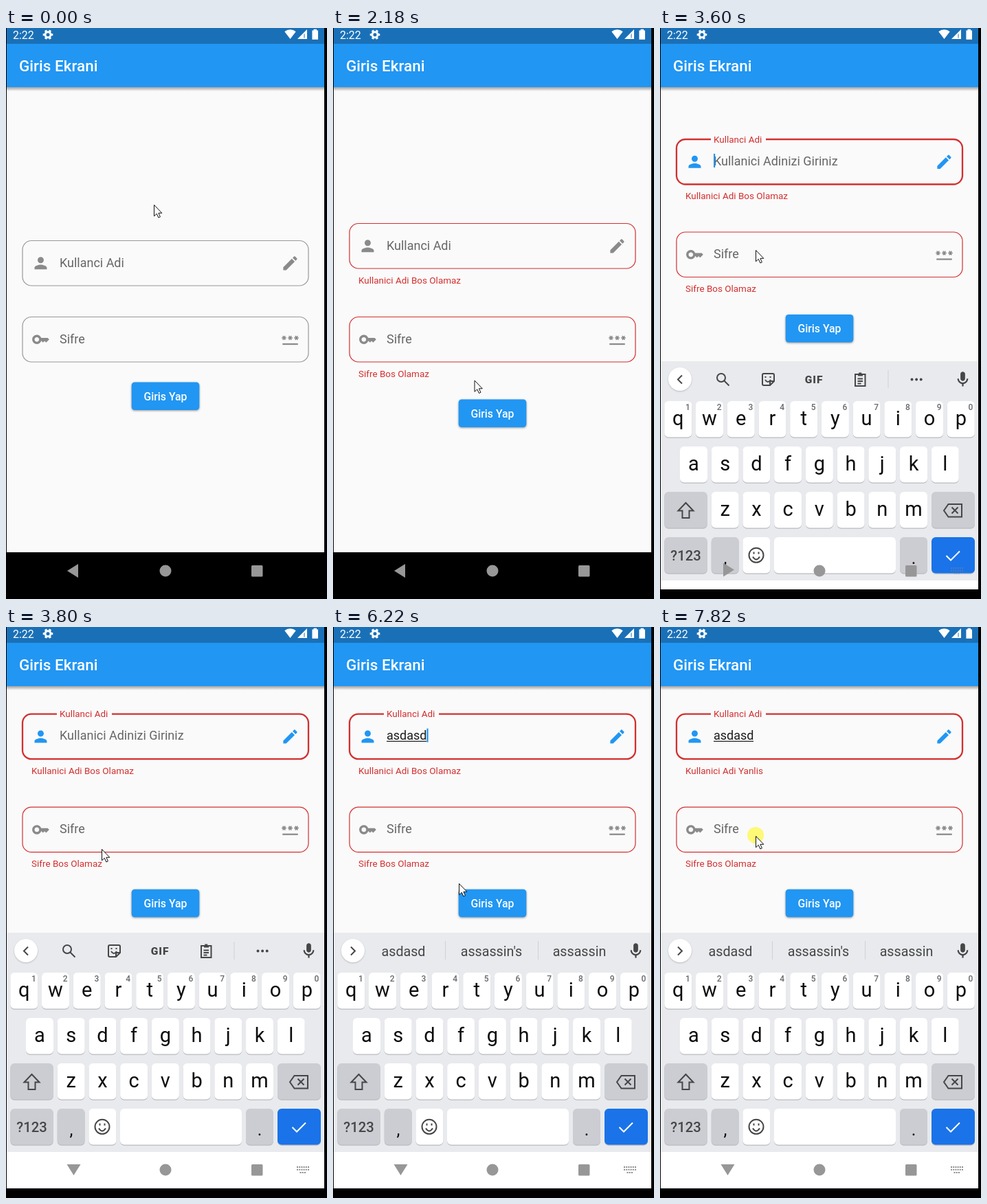
An HTML page that plays this animation: 467x831 px, repeating every 8 s.

```html
<!DOCTYPE html>
<html lang="tr">
<head>
<meta charset="utf-8">
<title>Giris Ekrani</title>
<style>
  html, body { margin: 0; width: 100%; height: 100%; overflow: hidden; background: #000; }
  svg { display: block; width: 100%; height: 100%; font-family: Roboto, sans-serif; }
  .line { fill: none; stroke: #444746; stroke-width: 2; }
  .input { font-size: 17.98px; fill: #666; }
  .small { font-size: 13.48px; fill: #d32f2f; }
  .icon { fill: #8a8a8a; }
  .nav { fill: #979797; }
  .letter { font-size: 29px; fill: #0c0c0c; text-anchor: middle; }
  .digit { font-size: 12px; font-weight: 500; fill: #66696d; text-anchor: end; }
  .word { font-size: 19.7px; fill: #444746; text-anchor: middle; }
</style>
</head>
<body>
<svg viewBox="0 0 467 831">
  <defs>
    <linearGradient id="fade" x2="0" y2="1">
      <stop stop-opacity=".36"/><stop offset="1" stop-opacity="0"/>
    </linearGradient>
    <clipPath id="btnClip"><rect x="182.7" width="98.6" height="40.5" rx="4.5"/></clipPath>
  </defs>
  <rect width="467" height="831"/>
  <rect x="1" width="462" height="763" fill="#fafafa"/>
  <rect x="1" y="86" width="462" height="6" fill="url(#fade)"/>
  <rect x="1" y="23" width="462" height="63" fill="#2196f3"/>
  <rect x="1" width="462" height="23" fill="#1a70b7"/>
  <text x="19" y="63" font-size="22.5" font-weight="500" fill="#fff">Giris Ekrani</text>

  <g fill="#fff">
    <text x="10" y="16" font-size="16">2:22</text>
    <g fill="none" stroke="#fff">
      <circle cx="61" cy="9.7" r="4" stroke-width="3"/>
      <circle cx="61" cy="9.7" r="6" stroke-width="2.6" pathLength="12" stroke-dasharray="1" stroke-dashoffset=".5"/>
    </g>
    <path d="M405.3 5.3a12.3 12.3 0 0 1 16.4 0L413.5 16z"/>
    <path d="M438 2v14h-14z"/>
    <path d="M433.5 9v5.6h1V8z" fill="#1a70b7"/>
    <path d="M447.5 3.4v-1.6h4.5v1.6h2v13.4h-8.6v-13.4z"/>
  </g>

  <g id="user">
    <rect class="box" x="24" width="416" height="65.5" rx="13" fill="none"/>
    <g id="floating">
      <rect x="74" y="-3" width="80" height="6" fill="#fafafa"/>
      <text class="small" x="78" y="4.5">Kullanci Adi</text>
    </g>
    <g class="icon" id="userIcons">
      <path transform="translate(37 19.3) scale(1.124)" d="M12 12c2.21 0 4-1.79 4-4s-1.79-4-4-4-4 1.79-4 4 1.79 4 4 4zm0 2c-2.67 0-8 1.34-8 4v2h16v-2c0-2.66-5.33-4-8-4z"/>
      <path transform="translate(400 19.3) scale(1.124)" d="M3 17.25V21h3.75L17.81 9.94l-3.75-3.75L3 17.25zM20.71 7.04c.39-.39.39-1.02 0-1.41l-2.34-2.34c-.39-.39-1.02-.39-1.41 0l-1.83 1.83 3.75 3.75 1.83-1.83z"/>
    </g>
    <text class="input" id="hint" x="78"></text>
    <text class="input" id="typed" x="78" y="37.3" style="fill:#1c1c1c"></text>
    <path id="under" d="M78 39.6h58" stroke="#222" stroke-width="1.2"/>
    <rect id="caret" y="21" width="2.2" height="20" fill="#2196f3"/>
    <text class="small error" x="37" y="87" id="userError"></text>
  </g>

  <g id="pass">
    <rect class="box" x="24" width="416" height="65.5" rx="13" fill="none"/>
    <g class="icon">
      <path transform="translate(37 19.3) scale(1.124)" d="M21 10h-8.35C11.83 7.67 9.61 6 7 6c-3.31 0-6 2.69-6 6s2.69 6 6 6c2.61 0 4.83-1.67 5.65-4H13l2 2 2-2 2 2 4-4.04L21 10zM7 15c-1.65 0-3-1.35-3-3s1.35-3 3-3 3 1.35 3 3-1.35 3-3 3z"/>
      <g id="stars" transform="translate(400 19.3) scale(1.124)" stroke="#8a8a8a" stroke-width="1.5"><path d="M2 18h20" stroke-width="2"/></g>
    </g>
    <text class="input" x="78" y="38.3">Sifre</text>
    <text class="small error" x="37" y="87">Sifre Bos Olamaz</text>
  </g>

  <g id="btn">
    <rect id="btnFace" x="182.7" width="98.6" height="40.5" rx="4.5"/>
    <g clip-path="url(#btnClip)"><circle id="ripple" cy="28" fill="#fff"/></g>
    <text x="232" y="26" font-size="15.75" font-weight="500" fill="#fff" text-anchor="middle">Giris Yap</text>
  </g>

  <rect id="navBack" x="1" y="764" width="462" height="53" fill="#fff"/>
  <g id="keyboard">
    <rect x="1" y="445" width="462" height="319" fill="#e8eaed"/>
    <circle cx="29" cy="471" r="17" fill="#fff" style="filter:drop-shadow(0 1px 1px #0003)"/>
    <path id="chevron" class="line"/>
    <path transform="translate(427 458) scale(1.124)" fill="#444746" d="M12 14c1.66 0 3-1.34 3-3V5c0-1.66-1.34-3-3-3S9 3.34 9 5v6c0 1.66 1.34 3 3 3zm5-3c0 2.76-2.24 5-5 5s-5-2.24-5-5H5c0 3.53 2.61 6.43 6 6.92V21h2v-3.08c3.39-.49 6-3.39 6-6.92h-2z"/>
    <g id="tools" class="line">
      <circle cx="89" cy="469" r="6"/><path d="M93.5 473.5l7 7"/>
      <path d="M151 463h13q2 0 2 2v9l-6 6h-9q-2 0-2-2v-13q0-2 2-2zM166 474h-4q-2 0-2 2v4M153 472q4 6 8 0M153.5 467v2M160.5 467v2"/>
      <path d="M284 464h14.500v17h-14.500zM288 465.500h7M287.500 470.500h7.500M287.500 474h7.500M287.500 477.500h5"/>
      <path d="M291.2 461.500v2" stroke-width="4"/>
      <path d="M332 458v26" stroke="#cfd1d4" stroke-width="1"/>
      <path d="M366.500 471.500h.01m6.600 0h.01m6.600 0h.01" stroke-width="4" stroke-linecap="round"/>
      <text x="224" y="476.500" font-size="15.500" font-weight="900" letter-spacing="1" text-anchor="middle" fill="#444746" stroke="none">GIF</text>
    </g>
    <g id="words">
      <path d="M163.500 457v27M298.500 457v27" stroke="#cfd1d4"/>
      <text class="word" x="102.500" y="478.500"></text>
      <text class="word" x="230.500" y="478.500"></text>
      <text class="word" x="358.500" y="478.500"></text>
    </g>
    <g id="keys"></g>
    <g class="line">
      <path d="M37.500 651l-11 11.500h6v10.500h10v-10.500h6z"/>
      <path d="M419.500 653h19.500v18.500h-19.500l-6.500-9.250zM424.500 657.500l9 9m0-9l-9 9"/>
      <circle cx="140" cy="727.300" r="10.500"/>
      <path d="M135 729.500q5 8 10 0M136.500 722.500v3M143.500 722.500v3"/>
      <path d="M416.500 728l6.500 6.500 13-13" stroke="#fff"/>
    </g>
    <text x="37.500" y="735" font-size="20.300" font-weight="500" fill="#444746" text-anchor="middle">?123</text>
    <text class="letter" x="95" y="740" style="font-size:25px">,</text>
    <text class="letter" x="369" y="740" style="font-size:25px">.</text>
  </g>

  <g class="nav">
    <path id="back" d="M89 790l16-10v20z"/>
    <circle cx="232" cy="790" r="8.500"/>
    <rect x="357" y="782" width="16.500" height="16.500" rx="1.500"/>
    <path id="kbIcon" d="M423 786h18M423 789.700h18M427.500 794h9" stroke="#8a8a8a" stroke-width="2"/>
  </g>

  <circle id="click" r="12" fill="#fff84a" fill-opacity=".75"/>
  <path id="cursor" d="M.5.500v16.300l3.800-3.500 2.600 5.700 2.500-1.100-2.500-5.600h4.900z" fill="#fff" stroke="#111"/>
</svg>
<script>
const $ = id => document.getElementById(id);
const all = sel => document.querySelectorAll(sel);
const LOOP = 8000;

// start time, top of user field, top of password field, top of button
const LAYOUT = [
  [0, 309.5, 420.5, 515.5],
  [1580, 284.5, 420.5, 540.5],
  [3600, 162, 297, 417],
  [3800, 126.7, 262.2, 381.7]
];
const POINTER = [
  [0, 215, 257], [200, 204, 285], [600, 174, 415], [800, 186, 495], [1180, 218, 544],
  [1980, 218, 544], [2380, 193, 481], [2800, 136, 345], [3000, 139, 323], [4000, 139, 323],
  [4200, 139, 335], [5400, 139, 335], [5820, 166, 309], [6220, 183, 373], [6420, 216, 405],
  [7220, 216, 405], [7820, 139, 304], [8000, 139, 304]
];
const PRESSES = [1380, 6620];
const CLICKS = [1180, 6420, 7820];
const TYPING = [[0, ''], [4800, 'asd'], [5000, 'asdas'], [5200, 'asdasd']];

const last = (rows, t) => rows.filter(r => r[0] <= t).pop();
const show = (el, on) => el.setAttribute('visibility', on ? 'inherit' : 'hidden');
const set = (el, attrs) => { for (const k in attrs) el.setAttribute(k, attrs[k]); };
const move = (el, x, y) => el.setAttribute('transform', `translate(${x} ${y})`);

function buildKeys() {
  const out = [];
  const key = (x, y, w = 40, fill = '#fff') => out.push(
    `<rect x="${x}" y="${y + 1.3}" width="${w}" height="52.5" rx="6" fill="#b9bbc0"/>` +
    `<rect x="${x}" y="${y}" width="${w}" height="52.5" rx="6" fill="${fill}"/>`);
  const row = (letters, x0, y) => [...letters].forEach((c, i) => {
    const x = x0 + i * 45.72;
    key(x, y);
    out.push(`<text class="letter" x="${x + 20}" y="${y + 35}">${c}</text>`);
    if (y < 510) out.push(`<text class="digit" x="${x + 37.5}" y="${y + 13}">${(i + 1) % 10}</text>`);
  });
  row('qwertyuiop', 6.3, 503);
  row('asdfghjkl', 29, 569);
  row('zxcvbnm', 74.7, 635);
  const grey = '#cbcdd3';
  key(6.3, 635, 62.5, grey);
  key(395, 635, 63, grey);
  key(6.3, 701, 62.5, grey);
  key(74.7, 701, 40, grey);
  key(120.4, 701);
  key(166, 701, 177);
  key(349, 701, 40, grey);
  key(395, 701, 63, '#1a73e8');
  $('keys').innerHTML = out.join('');
}

function buildStars() {
  $('stars').innerHTML += [4, 12, 20].map(x =>
    `<path transform="translate(${x} 9.97)" d="M-3 0h6M-1.5-2.600l3 5.200M1.500-2.600l-3 5.200"/>`).join('');
}

function tick(t) {
  const base = [5820, 2600, 1180, 0].find(b => t >= b);
  return base + Math.floor((t - base) / 200) * 200;
}

function pointerAt(t) {
  const i = Math.max(1, POINTER.findIndex(p => p[0] >= t));
  const [t0, x0, y0] = POINTER[i - 1], [t1, x1, y1] = POINTER[i];
  const k = (t - t0) / (t1 - t0);
  return [x0 + (x1 - x0) * k, y0 + (y1 - y0) * k];
}

function drawFields(t) {
  const focused = t >= 3400, floated = t >= 3600, failed = t >= 1780;
  all('.box').forEach((box, i) => set(box, {
    stroke: failed ? '#d32f2f' : '#999',
    'stroke-width': floated && i === 0 ? 2.3 : 1.2
  }));
  all('.error').forEach(e => show(e, failed));
  $('userError').textContent = t < 6820 ? 'Kullanici Adi Bos Olamaz' : 'Kullanici Adi Yanlis';
  show($('floating'), floated);
  $('userIcons').style.fill = focused ? '#2196f3' : '';

  const text = last(TYPING, t)[1];
  $('hint').textContent = floated ? 'Kullanici Adinizi Giriniz' : 'Kullanci Adi';
  set($('hint'), { y: floated ? 37.5 : 38.3, opacity: t < 4800 ? 1 : t < 5000 ? 0.15 : 0 });
  $('typed').textContent = text;
  show($('under'), t >= 5200);

  const typing = t >= 4800 && t < 5400;
  const blink = Math.floor((t - 5200) / 500) % 2 === 0;
  show($('caret'), focused && (typing || blink));
  $('caret').setAttribute('x', 78 + (text ? $('typed').getComputedTextLength() : 0));
}

function drawButton(t) {
  const start = PRESSES.find(p => t >= p && t < p + 600);
  const age = start === undefined ? -1 : t - start;
  const held = age >= 0 && age < 400;
  set($('btnFace'), {
    fill: held ? '#389ff4' : '#2196f3',
    style: `filter:drop-shadow(0 ${held ? '4px 4px #0006' : '1.5px 1.5px #0006'})`
  });
  show($('ripple'), age >= 0);
  set($('ripple'), { cx: 219, r: 10 + age * age / 4500, opacity: held ? 0.25 : 0.1 });
}

function drawKeyboard(t) {
  const open = t >= 3600, rising = open && t < 3800, words = t >= 4800;
  show($('navBack'), open);
  show($('keyboard'), open);
  move($('keyboard'), 0, rising ? 40 : 0);
  show($('tools'), open && !words);
  show($('words'), open && words);
  $('chevron').setAttribute('d', words ? 'M26 465.500l6 6-6 6' : 'M32 465.500l-6 6 6 6');
  const list = t < 5200 ? ['as', 'ad', 'ask'] : ['asdasd', "assassin's", 'assassin'];
  all('.word').forEach((w, i) => { w.textContent = list[i]; });

  const turn = rising ? 180 : open ? -90 : 0;
  $('back').setAttribute('transform', `translate(0 ${open ? -1.5 : 0}) rotate(${turn} 98.500 790)`);
  show($('kbIcon'), t >= 3400);
  set($('kbIcon'), { 'stroke-dasharray': '2 1.200', opacity: rising ? 0.4 : 1 });
}

function render(time) {
  const t = tick(time % LOOP);
  const [, user, pass, btn] = last(LAYOUT, t);
  move($('user'), 0, user);
  move($('pass'), 0, pass);
  move($('btn'), 0, btn);
  drawFields(t);
  drawButton(t);
  drawKeyboard(t);

  const [x, y] = pointerAt(t);
  move($('cursor'), x, y);
  move($('click'), x, y - 1);
  show($('click'), CLICKS.some(c => t >= c && t < c + 200));
}

buildKeys();
buildStars();
const begin = performance.now();
(function frame() {
  render(performance.now() - begin);
  requestAnimationFrame(frame);
})();
</script>
</body>
</html>
```
